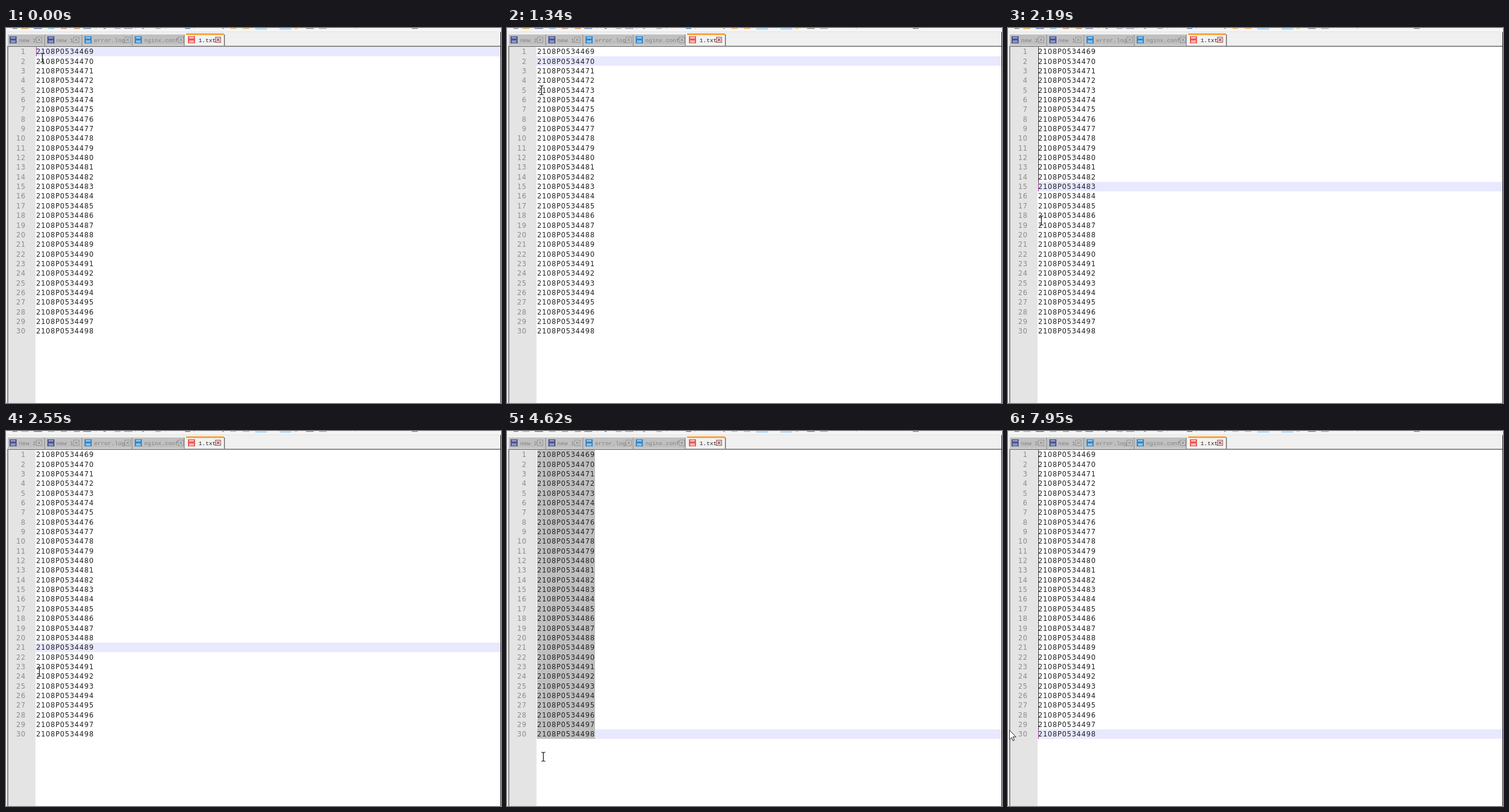
An HTML page that plays this animation: 838x636 px, repeating every 7.99 s.

```html
<!DOCTYPE html>
<html lang="en">
<head>
<meta charset="utf-8">
<title>Column selection in a text editor</title>
<style>
  html, body { margin: 0; width: 100%; height: 100%; overflow: hidden; background: #fff; }
  svg { display: block; width: 838px; height: 636px; }
  text { white-space: pre; }
  /* tabular digits with a plain zero, spaced to the editor's grid */
  .code, .num { font: 11.6px "DejaVu Sans", sans-serif; letter-spacing: .81px; fill: #222; }
  .num { fill: #8c8c8c; text-anchor: end; }
  .tab { font: 9.7px "Liberation Mono", monospace; fill: #808080; }
  .tab.on { fill: #222; }
</style>
</head>
<body>
<svg viewBox="0 0 838 636">
  <g id="chrome"></g>
  <rect id="current" x="50" width="787" height="16" fill="#e8e8ff"/>
  <rect id="selection" x="51" y="32" width="98" height="490" fill="#c0c0c0"/>
  <g id="lines"></g>
  <rect id="column" x="51" y="32" width="1" fill="#222"/>
  <rect id="caret" x="51" width="1" height="16" fill="#a04090"/>
  <path id="beam" fill="none" stroke="#111" stroke-width="1.2"
        d="M-3.5-7.5H-1L0-6.5L1-7.5H3.5M0-6.5V6.5M-3.5 7.5H-1L0 6.5L1 7.5H3.5"/>
  <path id="arrow" fill="#fff" stroke="#222" stroke-linejoin="round"
        d="M.5.5V16L4 12.8L6.4 18.3L8.8 17.2L6.4 11.8H11.5Z"/>
</svg>
<script>
const LOOP = 7990, PITCH = 16.345, TOP = 32;
const SELECT = 3840, CLEAR = 5240;
const $ = id => document.getElementById(id);

function add(parent, tag, attrs, text = "") {
  const el = document.createElementNS("http://www.w3.org/2000/svg", tag);
  for (const k in attrs) el.setAttribute(k, attrs[k]);
  el.textContent = text;
  parent.append(el);
}
const chrome = $("chrome");
const box = (x, y, width, height, fill) => add(chrome, "rect", { x, y, width, height, fill });

// Window frame
box(0, 0, 838, 32, "#f0f0f0");
box(0, 0, 838, 7, "#f5f5f5");
box(0, 6, 838, 1, "#e3e3e3");
box(0, 30, 3, 606, "#f0f0f0");
box(3, 32, 47, 604, "#e4e4e4");
box(2, 30, 2, 606, "#888");
box(2, 30, 835, 2, "#8c8c8c");
box(837, 7, 1, 629, "#222");

// Lower edges of the toolbar buttons
[[11, 8, "#7a8a7a"], [26, 12, "#e0a850"], [47, 14, "#6878a8"], [71, 11, "#80b8d8"],
 [93, 10, "#c89070"], [115, 10, "#d08850"], [131, 13, "#7888a8"], [165, 4, "#888"],
 [184, 10, "#aaa"], [200, 14, "#a0a0a8"], [230, 4, "#999"], [253, 9, "#aaa"],
 [303, 9, "#4888c8"], [366, 3, "#999"], [380, 10, "#e8b868"], [401, 11, "#e8b060"],
 [488, 6, "#e0c890"], [508, 13, "#888"], [530, 13, "#aaa"], [687, 10, "#888"]
].forEach(([x, w, c]) => box(x, 0, w, 1.4, c));
[422, 463].forEach(x => box(x, 0, 20, 3, "#b8dcf4"));
[152, 219, 270, 318, 591].forEach(x => box(x, 0, 1, 2, "#c8c8c8"));

// Tabs: left, right, close button, label, label x, icon colours
const navy = ["#4a5690", "#8c96bc"], blue = ["#2f86cc", "#8cc0e4"], red = ["#e85850", "#f6b8b4"];
[[3, 66, 51, "new 2", 22, navy], [67, 129, 114, "new 1", 85, navy],
 [130, 214, 201, "error.log", 149, blue], [215, 302, 291, "nginx.conf", 234, blue],
 [305, 370, 354, "1.txt", 326, red]
].forEach(([l, r, cx, label, x, [dark, light]]) => {
  const on = label === "1.txt";
  box(l, on ? 9 : 11, r - l, on ? 21 : 18, on ? "#f2f2f2" : "#c0c0c0");
  if (on) box(l, 9, r - l - 1, 3, "#faa43c");
  box(r - 1, 11, 1.4, 19, on ? "#666" : "#8c8c8c");
  box(l + 3, 14, 12, 12, dark);
  box(l + 5, 15, 8, 3, light);
  box(l + 5, 21, 8, 4, light);
  add(chrome, "text", { x, y: 23.7, class: on ? "tab on" : "tab" }, label);
  const line = on ? "#a05858" : "#909090";
  add(chrome, "rect", { x: cx + .5, y: 15.5, width: 9, height: 9, fill: on ? "#f0dcdc" : "#d0d0d0", stroke: line });
  add(chrome, "path", { d: `M${cx + 2.5} 17.5l5 5m0-5l-5 5`, stroke: line, "stroke-width": 1.4 });
});

for (let i = 0; i < 30; i++) {
  const y = 44.3 + i * PITCH;
  add($("lines"), "text", { x: 33.5, y, class: "num" }, i + 1);
  add($("lines"), "text", { x: 51, y, class: "code" }, "2108P0" + (534469 + i));
}

// Keys: time, then values
const pointer = [[0, 61, 50], [810, 60, 80], [1340, 58, 105], [1600, 57, 168], [1860, 56, 244],
  [2430, 56, 385], [2550, 56, 408], [3240, 58, 493], [3320, 58, 503], [3800, 61, 552],
  [4620, 61, 552], [5000, 38, 533], [5390, 20, 511], [5470, 17, 507], [6080, 16, 507], [6100, 2, 507]];
const row = [[0, 1], [800, 2], [1340, 2.9], [1860, 10.5], [2550, 21.5], [3320, 27.6], [3700, 30]];

function at(keys, t) {
  const i = keys.findIndex(k => k[0] > t);
  if (i < 0) return keys.at(-1).slice(1);
  const a = keys[i - 1], b = keys[i], u = (t - a[0]) / (b[0] - a[0]);
  return a.slice(1).map((v, j) => v + (b[j + 1] - v) * u);
}
const show = (id, on) => $(id).setAttribute("visibility", on ? "visible" : "hidden");

function draw(t) {
  const [x, y] = at(pointer, t);
  const top = Math.round((Math.floor(at(row, t)[0]) - 1) * PITCH);
  const selected = t >= SELECT && t < CLEAR;
  const blink = t < 1040 || (t + 760) % 1200 < 600;

  $("current").setAttribute("y", TOP + top);
  $("caret").setAttribute("y", TOP + top);
  $("column").setAttribute("height", top);
  show("selection", selected);
  show("caret", blink && !selected);
  show("column", blink && !selected);

  const inText = x > 50;
  show("beam", inText);
  show("arrow", !inText);
  $("beam").setAttribute("transform", `translate(${Math.round(x) + .5} ${Math.round(y) + .5})`);
  // The pointer is mirrored over the line-number margin
  $("arrow").setAttribute("transform", `translate(${x} ${y}) scale(${x > 3 ? -1 : 1} 1)`);
}

const start = performance.now();
function tick() {
  draw((performance.now() - start) % LOOP);
  requestAnimationFrame(tick);
}
tick();
</script>
</body>
</html>
```
